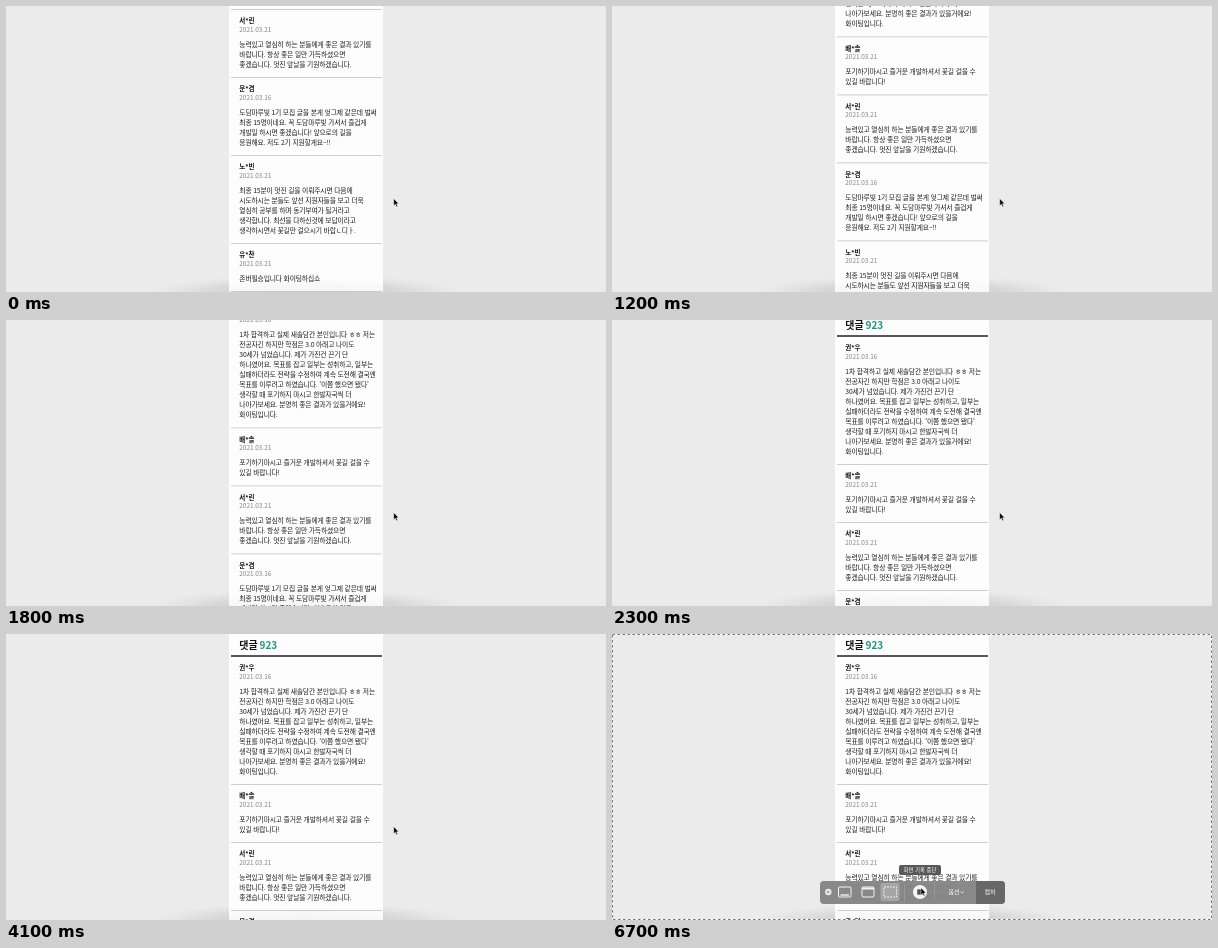
An HTML page that plays this animation: 600 px wide and 286 px high, repeating every 6800 ms.

```html
<!DOCTYPE html>
<html lang="ko">
<head>
<meta charset="utf-8">
<title>댓글</title>
<style>
html, body { margin: 0; width: 100%; height: 100%; overflow: hidden; background: #ebebeb; }
svg { display: block; width: 100vw; height: 100vh; }
text { font: 500 6.8px "Noto Sans CJK KR", "Noto Sans CJK", "Noto Sans", sans-serif; fill: #1c1c1c; letter-spacing: -.17px; }
.name { font-size: 6.5px; font-weight: 700; fill: #111; letter-spacing: 0; }
.date { font-size: 6.4px; font-weight: 400; fill: #808080; letter-spacing: 0; }
.title { font-size: 10px; font-weight: 700; fill: #111; letter-spacing: 0; }
.count { fill: #159a78; }
.sep { stroke: #cfcfcf; }
.bar text { font-size: 6px; fill: #fff; letter-spacing: 0; text-anchor: middle; }
.icon { fill: none; stroke: #f2f2f2; }
#tip text { font-size: 5.4px; }
</style>
</head>
<body>
<svg viewBox="0 0 600 286">
  <defs>
    <radialGradient id="shade">
      <stop offset="0" stop-color="#000" stop-opacity=".12"/>
      <stop offset=".6" stop-color="#000" stop-opacity=".07"/>
      <stop offset="1" stop-color="#000" stop-opacity="0"/>
    </radialGradient>
  </defs>
  <rect width="600" height="286" fill="#ebebeb"/>
  <ellipse cx="300" cy="287" rx="155" ry="18" fill="url(#shade)"/>
  <rect x="223" width="154" height="286" fill="#fdfdfd"/>
  <g id="page">
    <text class="title" x="233.3" y="15">댓글</text>
    <text class="title count" x="253.5" y="15">923</text>
    <path d="M225 22H376" stroke="#222" stroke-width="1.5"/>
  </g>
  <ellipse cx="300" cy="290" rx="130" ry="18" fill="url(#shade)" opacity=".35"/>

  <g id="capture" class="bar">
    <rect x=".5" y=".5" width="599" height="285" fill="none" stroke="#fff"/>
    <rect x=".5" y=".5" width="599" height="285" fill="none" stroke="#777" stroke-dasharray="2.5"/>
    <rect x="208" y="247" width="185" height="23" rx="4" fill="#858585" fill-opacity=".96"/>
    <path d="M364 247H389a4 4 0 0 1 4 4V266a4 4 0 0 1-4 4H364z" fill="#686868"/>
    <circle cx="216.3" cy="258" r="3.2" fill="#eee"/>
    <path d="M215 256.7l2.6 2.6m0-2.6l-2.6 2.6" stroke="#777" stroke-width=".8"/>
    <g class="icon">
      <rect x="226.5" y="253" width="12.5" height="10" rx="1"/>
      <path d="M228.5 261H237" stroke-width="1.4"/>
      <rect x="250" y="253" width="12" height="10" rx="1"/>
      <path d="M250 254.5H262" stroke-width="2"/>
    </g>
    <rect x="268.5" y="249" width="19" height="18" rx="2" fill="#a5a5a5"/>
    <rect class="icon" x="272" y="253" width="12.5" height="10" stroke-dasharray="1.8 1.2"/>
    <path d="M292.5 250V267M322.5 250V267" stroke="#a0a0a0" stroke-width=".7"/>
    <circle cx="308" cy="258" r="7" fill="#f5f5f5"/>
    <rect x="305.2" y="255.2" width="5.6" height="5.6" rx=".8" fill="#555"/>
    <text x="342" y="260.2">옵션</text>
    <path class="icon" d="M348.6 257.6l1.6 1.5 1.6-1.5" stroke-width=".8"/>
    <text x="378" y="260.2">캡처</text>
  </g>
  <g id="tip" class="bar">
    <rect x="287" y="231" width="42" height="10" rx="2" fill="#585858"/>
    <text x="308" y="238">화면 기록 중단</text>
  </g>
  <path id="cursor" d="M0 0V7.2L1.6 5.8 2.7 8.3 3.9 7.8 2.8 5.3H5z" fill="#000" stroke="#fff" stroke-width=".5"/>
</svg>
<script type="module">
const comments = [
  ["권*우", "2021.03.16", `1차 합격하고 실제 새솔담간 본인입니다 ㅎㅎ 저는
전공자긴 하지만 학점은 3.0 아래고 나이도
30세가 넘었습니다. 제가 가진건 끈기 단
하나였어요. 목표를 잡고 일부는 성취하고, 일부는
실패하더라도 전략을 수정하여 계속 도전해 결국엔
목표를 이루려고 하였습니다. '이쯤 했으면 됐다'
생각할 때 포기하지 마시고 한발자국씩 더
나아가보세요. 분명히 좋은 결과가 있을거에요!
화이팅입니다.`],
  ["배*솔", "2021.03.21", `포기하기마시고 즐거운 개발하셔서 꽃길 걸을 수
있길 바랍니다!`],
  ["서*린", "2021.03.21", `능력있고 열심히 하는 분들에게 좋은 결과 있기를
바랍니다. 항상 좋은 일만 가득하셨으면
좋겠습니다. 멋진 앞날을 기원하겠습니다.`],
  ["문*겸", "2021.03.16", `도담마루빛 1기 모집 글을 본게 엊그제 같은데 벌써
최종 15명이네요. 꼭 도담마루빛 가셔서 즐겁게
개발일 하시면 좋겠습니다! 앞으로의 길을
응원해요. 저도 2기 지원할게요~!!`],
  ["노*빈", "2021.03.21", `최종 15분이 멋진 길을 이뤄주시면 다음에
시도하시는 분들도 앞선 지원자들을 보고 더욱
열심히 공부를 하며 동기부여가 될거라고
생각합니다. 최선을 다하신것에 보답이라고
생각하시면서 꽃길만 걸으시기 바랍ㄴ디ㅏ.`],
  ["유*찬", "2021.03.21", `존버필승입니다 화이팅하십쇼`]
];
const $ = id => document.getElementById(id);

function add(tag, attrs, text = "") {
  const el = document.createElementNS("http://www.w3.org/2000/svg", tag);
  for (const key in attrs) el.setAttribute(key, attrs[key]);
  el.textContent = text;
  $("page").append(el);
}

function buildPage() {
  let y = 34;
  for (const [name, date, body] of comments) {
    const lines = body.split("\n");
    add("text", { class: "name", x: 233.3, y: y + 2.4 }, name);
    add("text", { class: "date", x: 233.3, y: y + 10.6 }, date);
    lines.forEach((line, i) => add("text", { x: 233.3, y: y + 25.5 + i * 10 }, line));
    y += 38 + lines.length * 10;
    add("path", { class: "sep", d: `M225 ${y - 11.5}H376` });
  }
}

// Keys are [ms, value]; each stretch eases out.
function track(keys, t) {
  const i = keys.findIndex(key => key[0] > t);
  if (i === 0) return keys[0][1];
  if (i < 0) return keys.at(-1)[1];
  const [t0, a] = keys[i - 1], [t1, b] = keys[i];
  return b + (a - b) * ((t1 - t) / (t1 - t0)) ** 2;
}

const pageY = [[700, -205], [1400, -112], [2100, -27], [2300, -6], [2600, -6],
  [2800, 0], [2900, 0], [3000, 1.4], [3300, 0]];
const cursorX = [[5900, 387.7], [6200, 341], [6300, 341], [6500, 309]];
const cursorY = [[5900, 192.5], [6200, 248], [6300, 248], [6500, 253.7]];
const captureFade = [[5500, 0], [5700, 1]];
const tipFade = [[6500, 0], [6700, 1]];

function draw(now) {
  const t = Math.floor(now % 6800 / 100) * 100; // ten pictures a second
  $("page").setAttribute("transform", `translate(0 ${track(pageY, t)})`);
  $("cursor").setAttribute("transform", `translate(${track(cursorX, t)} ${track(cursorY, t)})`);
  $("capture").setAttribute("opacity", track(captureFade, t));
  $("tip").setAttribute("opacity", track(tipFade, t));
}

const start = performance.now();
function loop() {
  draw(performance.now() - start);
  requestAnimationFrame(loop);
}

buildPage();
loop();
</script>
</body>
</html>
```
